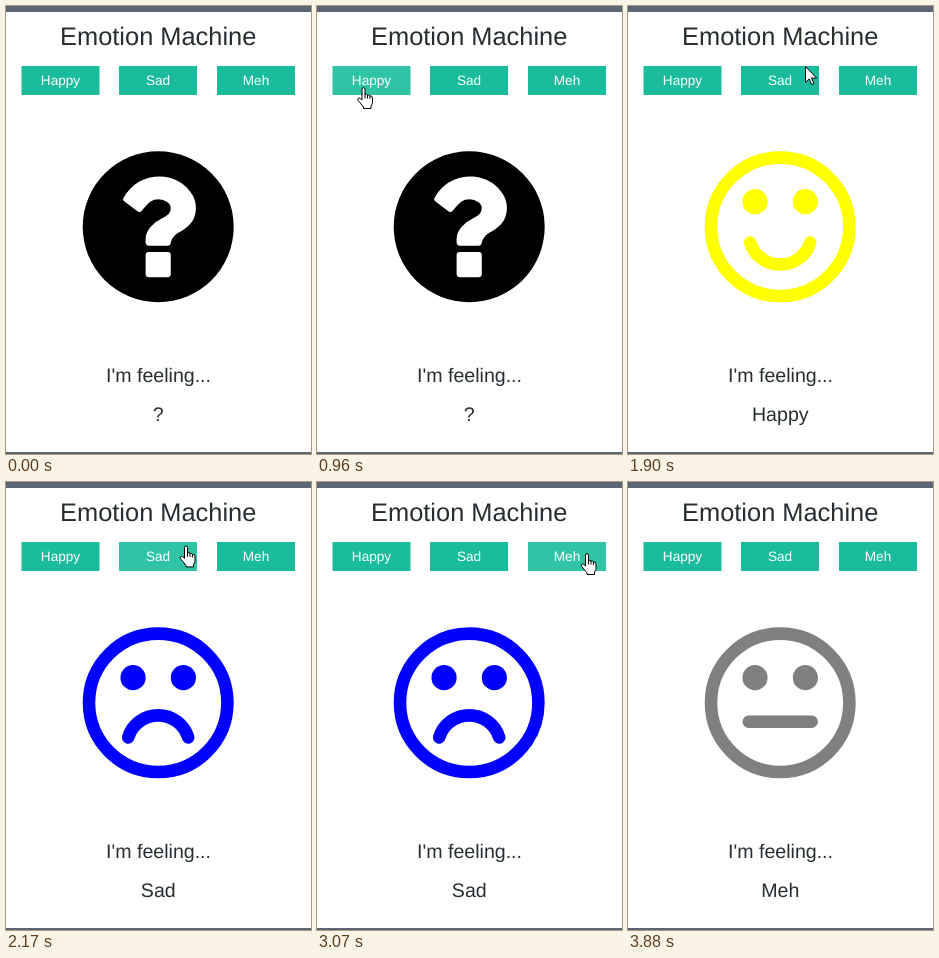
Animation, 305 px wide and 448 px high, one loop 4680 ms. Source, as an HTML page:

```html
<!DOCTYPE html>
<html lang="en">
<head>
<meta charset="utf-8">
<title>Emotion Machine</title>
<style>
  html, body { margin: 0; width: 100%; height: 100%; overflow: hidden; background: #fff; }
  svg { display: block; width: 100%; height: 100%; }
  text { font-family: Arial, "Liberation Sans", sans-serif; text-anchor: middle; fill: #272e32; text-rendering: geometricPrecision; }
  .label { font-size: 13.6px; fill: #fff; }
  .line { font-size: 19.6px; }
  .cursor { fill: #fff; stroke: #000; stroke-linejoin: round; }
</style>
</head>
<body>
<svg viewBox="0 0 305 448">
  <rect width="305" height="448" fill="#fff"/>
  <rect width="305" height="6" fill="#5a6673"/>
  <rect y="446" width="305" height="2" fill="#5a6673"/>
  <text x="152.2" y="39" font-size="25.4">Emotion Machine</text>
  <g id="buttons"></g>

  <!-- icon space: y points up, centre at 768,640 -->
  <g transform="translate(152.2 220.8) scale(.0983 -.0983) translate(-768 -640)">
    <g id="unknown">
      <circle cx="768" cy="640" r="768"/>
      <g fill="#fff">
        <rect x="640" y="128" width="256" height="256" rx="32"/>
        <path d="M1152 832q0 88-55.5 163t-138.5 116-170 41q-243 0-371-213-15-24 8-42l132-100q7-6 19-6 16 0 25 12 53 68 86 92 34 24 86 24 48 0 85.5-26t37.5-59q0-38-20-61t-68-45q-63-28-115.5-86.5t-52.5-125.5v-36q0-14 9-23t23-9h192q14 0 23 9t9 23q0 19 21.5 49.5t54.5 49.5q32 18 49 28.5t46 35 44.5 48 28 60.5 12.5 81z"/>
      </g>
    </g>
    <g id="face">
      <circle cx="768" cy="640" r="704" fill="none" stroke="currentColor" stroke-width="128"/>
      <g fill="currentColor">
        <circle cx="512" cy="896" r="128"/>
        <circle cx="1024" cy="896" r="128"/>
        <path id="mouth"/>
      </g>
    </g>
  </g>

  <text class="line" x="152.5" y="376">I'm feeling...</text>
  <text class="line" id="mood" x="152.3" y="415"></text>

  <path id="arrow" class="cursor" d="M.5 .5V16.5L4.2 13 6.6 18.5 8.9 17.5 6.5 12.1H11.6Z"/>
  <path id="hand" class="cursor" d="M5 13V2.2Q5 .6 6.5 .6T8 2.2V7.5Q9.6 6.6 10.5 8 12.2 7.4 12.9 9 15.5 8.4 15.5 11V15.5Q15.5 17 14 19V21.5H6.5V20L1 13.2Q.2 11.4 1.8 11 3 10.8 5 13ZM8 7.5V11.5M10.5 8V11.5M12.9 9V12"/>
</svg>
<script>
const LOOP = 4680, STEP = 70, SHOW = 200, HIDE = 3880;
const $ = id => document.getElementById(id);

const labels = [["Happy", 15.5], ["Sad", 113], ["Meh", 211]];
const BTN = { y: 60, w: 78, h: 29 };

const moods = [
  { at: 0, name: "?" },
  { at: 1090, name: "Happy", color: "#ff0",
    mouth: "M1134 461q-37-121-138-195t-228-74-228 74-138 195q-8 25 4 48.5t38 31.5q25 8 48.5-4t31.5-38q25-80 92.5-129.5t151.5-49.5 151.5 49.5 92.5 129.5q8 26 32 38t49 4 37-31.5 4-48.5z" },
  { at: 2100, name: "Sad", color: "#00f",
    mouth: "M1134 307q8-25-4-48.5t-37-31.5-49 4-32 38q-25 80-92.5 129.5t-151.5 49.5-151.5-49.5-92.5-129.5q-8-26-31.5-38t-48.5-4q-26 8-38 31.5t-4 48.5q37 121 138 195t228 74 228-74 138-195z" },
  { at: 3140, name: "Meh", color: "#808080",
    mouth: "M1152 448q0-26-19-45t-45-19h-640q-26 0-45 19t-19 45 19 45 45 19h640q26 0 45-19t19-45z" }
];

// pointer moves: start, end, jumps, then a quadratic curve
const moves = [
  [200, 680, 7, [296, 388], [120, 230], [16, 132]],
  [750, 960, 3, [22, 118], [36, 84], [46.5, 81.6]],
  [1480, 1900, 6, [52, 74], [100, 20], [177, 60]],
  [1970, 1970, 0, [180, 64], [180, 64], [180, 64]],
  [2580, 3070, 7, [191, 55], [235, 30], [270, 71.6]],
  [3810, 3810, 0, [269, 73.5], [269, 73.5], [269, 73.5]]
];

const svgNode = (tag, attrs, text = "") => {
  const el = document.createElementNS("http://www.w3.org/2000/svg", tag);
  for (const k in attrs) el.setAttribute(k, attrs[k]);
  el.textContent = text;
  return $("buttons").appendChild(el);
};

const buttons = labels.map(([name, x]) => {
  const rect = svgNode("rect", { x, y: BTN.y, width: BTN.w, height: BTN.h });
  svgNode("text", { class: "label", x: x + BTN.w / 2, y: 79 }, name);
  return rect;
});

const lastBefore = (list, t, start) => list.filter(e => start(e) <= t).pop();

function pointer(t) {
  if (t < SHOW || t >= HIDE) return null;
  const [t0, t1, n, a, c, b] = lastBefore(moves, t, m => m[0]);
  const u = n ? Math.min(n, Math.floor((t - t0) / (t1 - t0) * n + .01)) / n : 1;
  const v = 1 - u;
  return a.map((p, i) => p * v * v + 2 * c[i] * u * v + b[i] * u * u);
}

function buttonAt(p) {
  if (!p || p[1] < BTN.y + .5 || p[1] > BTN.y + BTN.h) return -1;
  return labels.findIndex(([, x]) => p[0] >= x && p[0] <= x + BTN.w);
}

function place(el, on, x, y) {
  el.style.display = on ? "" : "none";
  if (on) el.setAttribute("transform", `translate(${x} ${y})`);
}

function draw(t) {
  const mood = lastBefore(moods, t, m => m.at);
  $("mood").textContent = mood.name;
  $("unknown").style.display = mood.mouth ? "none" : "";
  $("face").style.display = mood.mouth ? "" : "none";
  if (mood.mouth) {
    $("face").style.color = mood.color;
    $("mouth").setAttribute("d", mood.mouth);
  }

  const p = pointer(t);
  const over = buttonAt(p) >= 0;
  place($("arrow"), p && !over, p && p[0], p && p[1]);
  place($("hand"), p && over, p && p[0] - 6.5, p && p[1] - .6);

  // the highlight trails the pointer by one step
  const lit = p ? buttonAt(pointer(t - STEP)) : -1;
  buttons.forEach((b, i) => b.setAttribute("fill", i === lit ? "#31c3a6" : "#1abc9c"));
}

const begin = performance.now();
function tick() {
  draw((performance.now() - begin) % LOOP);
  requestAnimationFrame(tick);
}
tick();
</script>
</body>
</html>
```
